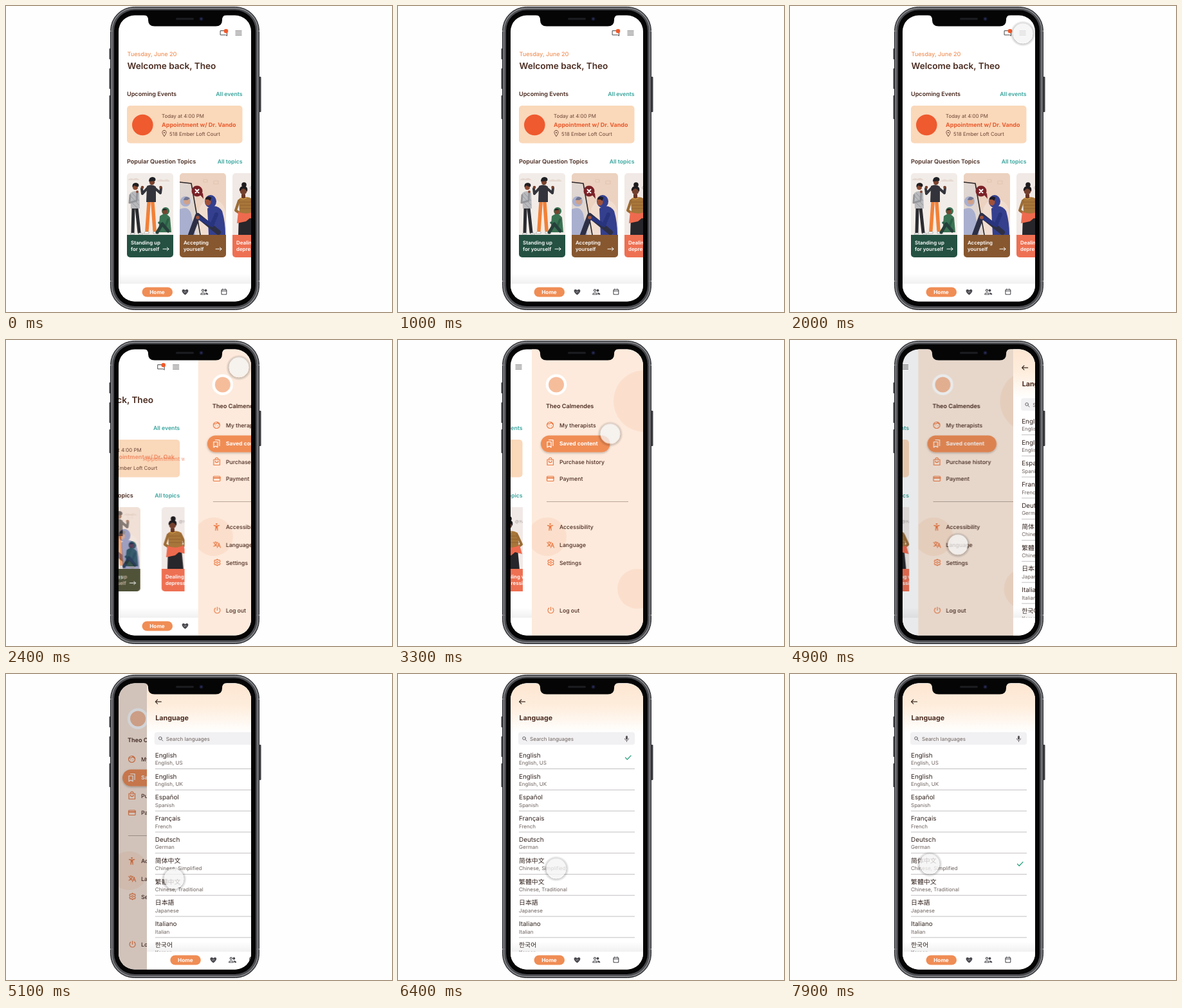
Animation of 600x476 px, one loop 8 s. Source, as an HTML page:

```html
<!DOCTYPE html>
<html lang="en">
<head>
<meta charset="utf-8">
<title>Care app prototype</title>
<style>
html, body { margin: 0; width: 100%; height: 100%; overflow: hidden; background: #fefeff; }
svg { display: block; width: 600px; height: 476px; }
text {
  font-family: Inter, "Noto Sans CJK SC", "Noto Sans CJK JP", "Noto Sans CJK KR", sans-serif;
  font-size: 8.7px; font-weight: 500; fill: #4a2b20; text-rendering: geometricPrecision;
}
.head { font-size: 9.1px; font-weight: 600; }
.link { font-size: 8.7px; font-weight: 600; fill: #36a39c; text-anchor: end; }
.small { font-size: 7.9px; font-weight: 400; fill: #6b4636; }
.visit { font-size: 9px; font-weight: 700; fill: #ea5a2c; }
.label text { font-size: 7.9px; font-weight: 600; fill: #fff; }
.row { font-size: 9.9px; font-weight: 400; fill: #33241f; }
.sub { font-size: 8px; font-weight: 400; fill: #6d625e; }
.line { fill: none; stroke-linecap: round; stroke-linejoin: round; }

/* Every part shares one 8 s clock. */
.open, .push, .fadein, .fadeout, .dim, .cursor, .first, .second { animation: 8s linear infinite both; }
.open { animation-name: open; }
.push { animation-name: push; }
.fadein { animation-name: fade; --from: 0; --to: 1; }
.fadeout { animation-name: fade; --from: 1; --to: 0; }
.dim { animation-name: dim; }
.cursor { animation-name: travel, appear; }
.first { animation-name: swap; --from: 1; --to: 0; }
.second { animation-name: swap; --from: 0; --to: 1; }

@keyframes open {
  0%, 28.06% { transform: translateX(0); animation-timing-function: ease-out; }
  33.06%, 100% { transform: translateX(var(--dx)); }
}
@keyframes push {
  0%, 60.75% { transform: translateX(0); animation-timing-function: ease-out; }
  65.75%, 100% { transform: translateX(var(--dx)); }
}
@keyframes fade {
  0%, 28.06% { opacity: var(--from); animation-timing-function: ease-out; }
  33.06%, 100% { opacity: var(--to); }
}
@keyframes dim {
  0%, 60.75% { opacity: 0; }
  61.25% { opacity: .085; }
  65.75%, 100% { opacity: .25; }
}
@keyframes swap {
  0%, 93.74% { opacity: var(--from); }
  93.75%, 100% { opacity: var(--to); }
}
@keyframes appear {
  0%, 17.5% { opacity: 0; }
  21.25%, 100% { opacity: 1; }
}
@keyframes travel {
  0%, 36% { transform: translate(362px, 42px); animation-timing-function: ease-in; }
  41.25% { transform: translate(330px, 145px); animation-timing-function: ease-out; }
  48.75%, 73.75% { transform: translate(261px, 318px); animation-timing-function: ease-in; }
  80% { transform: translate(246px, 302px); animation-timing-function: ease-out; }
  87.5%, 100% { transform: translate(217px, 295px); }
}
</style>
</head>
<body>
<svg viewBox="0 0 600 476" xmlns="http://www.w3.org/2000/svg">
<defs>
  <linearGradient id="shade" x2="0" y2="1">
    <stop offset="0" stop-color="#000" stop-opacity="0"/><stop offset="1" stop-color="#000" stop-opacity=".055"/>
  </linearGradient>
  <linearGradient id="peach" x2="0" y2="1">
    <stop offset="0" stop-color="#fde6d2"/><stop offset=".45" stop-color="#feeddc"/><stop offset="1" stop-color="#fff"/>
  </linearGradient>
  <radialGradient id="halo">
    <stop offset=".77" stop-color="#000" stop-opacity="0"/><stop offset=".78" stop-color="#000" stop-opacity=".2"/>
    <stop offset="1" stop-color="#000" stop-opacity="0"/>
  </radialGradient>
  <filter id="soft" x="-50%" y="-50%" width="200%" height="200%">
    <feDropShadow dx="0" dy="1.5" stdDeviation="1.6" flood-opacity=".25"/>
  </filter>
  <clipPath id="screen"><rect x="175" y="14.500" width="206" height="445" rx="25"/></clipPath>
  <clipPath id="strip"><rect x="100" y="150" width="284" height="260"/></clipPath>
  <clipPath id="cardShape"><rect width="72" height="131" rx="5"/></clipPath>
  <clipPath id="drawerShape"><rect x="208" y="0" width="260" height="476"/></clipPath>

  <path id="arrow" class="line" d="M0 0h9m-2.500-2.500 2.500 2.500-2.500 2.500" stroke="#fff"/>
  <path id="check" class="line" d="M353.500 130l2.800 3 5.700-6" stroke="#36a588" stroke-width="1.300"/>
  <path id="burger" d="M356.500 39h10m-10 3h10m-10 3h10" stroke="#4b4748"/>

  <g id="nav">
    <rect x="175" y="416" width="210" height="16" fill="url(#shade)"/>
    <rect x="175" y="432" width="210" height="30" fill="#fff"/>
    <rect x="211.500" y="437.500" width="47.500" height="15" rx="7.500" fill="#f08d55"/>
    <text x="235" y="447.900" text-anchor="middle" style="font-size:8.2px;font-weight:700;fill:#fff">Home</text>
    <g fill="#4b4a50">
      <path d="M278.500 449.500c-7-5-5.200-8.800-2.700-8.800 1.300 0 2.200.8 2.700 1.700.5-.9 1.400-1.700 2.700-1.700 2.500 0 4.300 3.800-2.700 8.800z"/>
      <path d="M276.500 444.500l1.300 1 1.300-1.300 1.300 1" fill="none" stroke="#fff" stroke-width=".6"/>
      <circle cx="310.500" cy="442.500" r="1.900"/>
      <path d="M310 445.700c3 0 4.300 1.300 4.300 3.300h-3z"/>
    </g>
    <g class="line" stroke="#4b4a50" stroke-width="1.100">
      <circle cx="306" cy="442.500" r="1.600"/><path d="M302.800 448.700c0-3.300 6.800-3.300 6.800 0z"/>
      <rect x="335" y="441" width="7.800" height="7.800" rx="1"/><path d="M335 443.300h7.800m-6-3.300v1m4-1v1"/>
    </g>
  </g>

  <g id="standing" clip-path="url(#cardShape)">
    <rect width="72" height="131" fill="#f2ece8"/>
    <path d="M1 11q4-5 9-2 5-4 10 2zM46 13q5-6 11-2 6-4 10 2z" fill="#e6dad2"/>
    <g class="line" stroke="#2a2b30">
      <path d="M10 54l-1 38m6-38 4 38" stroke-width="5"/>
    </g>
    <path d="M5 31q8-6 14 0l1 24H6z" fill="#b9babd"/>
    <path d="M6 36l13 14m-13-6 11 11m-9-24 11 12" stroke="#8b8e94" stroke-width=".8"/>
    <path class="line" d="M5 34l-1 12 11-3 1-13" stroke="#94969b" stroke-width="3"/><circle cx="16" cy="29" r="2" fill="#8a4a33"/>
    <circle cx="13" cy="22" r="4" fill="#8a4a33"/><path d="M8.500 22q-1-7 5.500-7 6 1 4 6-5 0-6-2z" fill="#201d20"/>
    <path class="line" d="M34 46l-3 43m9-43 3 43" stroke="#f18138" stroke-width="5.500"/>
    <path d="M31 20q8-4 14 1v24H30z" fill="#33343b"/>
    <path class="line" d="M32 23l-8 9-1-8m21 0 8 7 1-8" stroke="#33343b" stroke-width="4"/>
    <circle cx="24" cy="22" r="2.300" fill="#74402d"/><circle cx="52.500" cy="22" r="2.300" fill="#74402d"/>
    <circle cx="39" cy="14" r="4.200" fill="#7a432f"/><path d="M34 13q0-7 6-7 6 1 4 6z" fill="#1f2024"/>
    <path d="M7 93h5v2H5zm11 0h5l2 2h-7zm10-2h6v3h-8zm13 0h6l3 3h-9z" fill="#fff" stroke="#55565a" stroke-width=".4"/>
    <path d="M51 67q9-8 16 2l2 23H49z" fill="#3a7353"/>
    <circle cx="60" cy="59" r="6" fill="#3a7353"/><circle cx="59" cy="60" r="3.800" fill="#794430"/>
    <path d="M55 58q2-5 8-1z" fill="#1c1b1d"/>
    <path class="line" d="M64 72l-5 12-9-7" stroke="#2b5f46" stroke-width="3.500"/>
    <path class="line" d="M64 90l-9-11-8 13" stroke="#26403b" stroke-width="5"/>
    <rect y="96" width="72" height="35" fill="#245142"/>
    <g class="label"><text x="6" y="110.500">Standing up</text><text x="6" y="121">for yourself</text></g>
    <use href="#arrow" x="56" y="118"/>
  </g>

  <g id="accepting" clip-path="url(#cardShape)">
    <rect width="72" height="131" fill="#ecd2c0"/>
    <path d="M27 96q-4-54 22-56 23 2 23 30v26z" fill="#f1ddd0"/>
    <path d="M0 15l17 2 14 80H0z" fill="#dfd6d1"/>
    <path d="M0 56q14-6 18 8l6 32H0z" fill="#a9afce"/><circle cx="9" cy="44" r="8" fill="#a9afce"/>
    <circle cx="11" cy="44" r="4.800" fill="#cfa189"/><path d="M6 42q2-8 10-3l-4 3z" fill="#727591"/>
    <path class="line" d="M0 14l18 2 14 80" stroke="#28262a" stroke-width="1.600"/>
    <path d="M37 10h6v4h-6zm16 2h7v5h-7z" fill="none" stroke="#dcbfac" stroke-width=".7"/>
    <path d="M43 55q14-9 23 4 5 17 5 37H45z" fill="#343f8e"/>
    <path class="line" d="M60 92l-32-26-11 30" stroke="#2d2f45" stroke-width="8"/>
    <path class="line" d="M57 64l-7 17-19-11" stroke="#28347d" stroke-width="6"/><circle cx="28" cy="69" r="2.800" fill="#a0523a"/>
    <ellipse cx="48" cy="44" rx="9" ry="10" fill="#343f8e"/>
    <ellipse cx="44" cy="44.500" rx="4.600" ry="6" fill="#a0523a"/><path d="M39.500 41q2-7 10-3l-2 5-3-2z" fill="#1f1b25"/>
    <path d="M31 33l6 7-1-9z" fill="#7a2127"/><circle cx="27" cy="28" r="8.500" fill="#7a2127"/>
    <path class="line" d="M24.500 25.500l5 5m0-5-5 5" stroke="#fff" stroke-width="2"/>
    <rect y="96" width="72" height="35" fill="#87572f"/>
    <g class="label"><text x="6" y="110.500">Accepting</text><text x="6" y="121">yourself</text></g>
    <use href="#arrow" x="56" y="118"/>
  </g>

  <g id="dealing" clip-path="url(#cardShape)">
    <rect width="72" height="131" fill="#f1e9e6"/>
    <text x="27" y="25" style="font-size:6px;fill:#a9a1a0">@?!#</text>
    <path d="M10 66h21l3 31H9z" fill="#27262b"/>
    <path d="M10 40q11-6 21 0l2 24H11z" fill="#a8763a"/>
    <path d="M11 45h20m-20 5h21m-21 5h22" stroke="#875a2c" stroke-width=".7"/>
    <path class="line" d="M10 43l-5 15 9 6m16-21 7 15-8 6" stroke="#9c6c34" stroke-width="4"/>
    <path d="M9 60q13 6 25-1l4 14-11-3-6 5-14 3z" fill="#ee6a4e"/>
    <path d="M14 33h6v5q-3 4-6 0z" fill="#673626"/><circle cx="17" cy="28" r="5.300" fill="#74402e"/>
    <circle cx="18" cy="18" r="3.800" fill="#1d1a1d"/><path d="M11 28q-1-8 7-8 7 1 5 9-3-5-7-5z" fill="#1d1a1d"/>
    <path d="M12 38q5 4 10 0" fill="none" stroke="#e9b050"/>
    <rect y="96" width="72" height="35" fill="#ee7053"/>
    <g class="label open" style="--dx:7px"><text x="6" y="110.500">Dealing with</text><text x="6" y="121">depression</text></g>
    <use href="#arrow" x="58" y="118"/>
  </g>
</defs>

<!-- Phone body -->
<g fill="#3a3b3e">
  <rect x="160.500" y="66" width="3" height="17" rx="1"/><rect x="160.500" y="97" width="3" height="32" rx="1"/>
  <rect x="160.500" y="139" width="3" height="37" rx="1"/><rect x="393" y="110" width="3.500" height="55" rx="1"/>
</g>
<rect x="162.500" y="1.500" width="231" height="471" rx="37" fill="#4b4c50" stroke="#2c2d30"/>
<rect x="164.500" y="3.500" width="227" height="467" rx="35" fill="none" stroke="#8c8d91" stroke-width="1.400"/>
<rect x="168" y="6.500" width="220" height="460.500" rx="32" fill="#050506"/>
<path d="M162 39h4m-4 389h4m224-389h4m-4 389h4" stroke="#77787b" stroke-width="2"/>

<g clip-path="url(#screen)">
  <rect x="170" y="10" width="220" height="456" fill="#fff"/>
  <g class="push" style="--dx:-52px">
    <!-- Home -->
    <g class="open" style="--dx:-174px">
      <path class="line" d="M333.500 38.500h10v8l-2-1.500h-8z" stroke="#4b4748"/>
      <circle cx="342" cy="39" r="3.300" fill="#f05a2b"/>
      <use href="#burger"/>
      <text x="188.500" y="78" style="font-size:9.100px;fill:#f0935b">Tuesday, June 20</text>
      <text x="188.500" y="97.500" style="font-size:13.600px;font-weight:600">Welcome back, Theo</text>
      <text x="188" y="140" class="head">Upcoming Events</text>
      <text x="367.500" y="140" class="link">All events</text>
      <rect x="188" y="155" width="179.500" height="58.500" rx="5" fill="#fad8ba"/>
      <circle cx="212.300" cy="185" r="16.300" fill="#ef5a2f"/>
      <text x="242" y="174.300" class="small">Today at 4:00 PM</text>
      <path class="line" d="M246 202.500c-5-5.500-3-9 0-9s5 3.500 0 9z" stroke="#6b4636"/><circle cx="246" cy="197" r="1" fill="#6b4636"/>
      <text x="254" y="201.800" class="small">518 Ember Loft Court</text>
      <text x="188" y="244.500" class="head">Popular Question Topics</text>
      <text x="367.500" y="244.500" class="link">All topics</text>
    </g>
    <g class="open" style="--dx:-205px"><text x="272" y="185" class="visit fadein">Appointment w/ Dr. Oak</text></g>
    <g class="open" style="--dx:-190px" clip-path="url(#strip)">
      <g class="open" style="--dx:138px"><text x="242" y="187.500" class="visit fadeout">Appointment w/ Dr. Vando</text></g>
      <g class="open" style="--dx:-49px">
        <use href="#standing" x="188" y="260"/>
        <use href="#accepting" x="270" y="260"/>
        <g class="fadein"><use href="#standing" x="270" y="260"/></g>
      </g>
      <g class="open" style="--dx:-7px"><use href="#dealing" x="352" y="260"/></g>
    </g>
    <use href="#nav"/>

    <!-- Drawer -->
    <g transform="translate(206 0)"><g class="open" style="--dx:-206px" clip-path="url(#drawerShape)">
      <rect x="208" y="0" width="260" height="476" fill="#fdeadc"/>
      <g fill="#fbdfcc"><circle cx="383" cy="95" r="48"/><circle cx="232" cy="306" r="30"/><circle cx="372" cy="387" r="31"/></g>
      <circle cx="246" cy="69.500" r="16.300" fill="#fff"/><circle cx="246" cy="69.500" r="12" fill="#f6bd9b"/>
      <text x="230" y="106" class="head">Theo Calmendes</text>
      <rect x="222" y="148.500" width="107.500" height="26" rx="13" fill="#f08d55" filter="url(#soft)"/>
      <text x="251" y="136">My therapists</text>
      <text x="251" y="164.300" style="font-weight:700;font-size:8.500px;fill:#fff">Saved content</text>
      <text x="251" y="193">Purchase history</text>
      <text x="251" y="219">Payment</text>
      <path d="M231 251.500h127" stroke="#b9a79b"/>
      <text x="251" y="294">Accessibility</text>
      <text x="251" y="321.500">Language</text>
      <text x="251" y="349.500">Settings</text>
      <text x="251" y="424">Log out</text>
      <g class="line" stroke="#ec7b45" stroke-width="1.200">
        <circle cx="236.500" cy="132.500" r="5"/><path d="M231.800 131q5 0 6.500-3 1 3 3 3m-6.500 2.500h.1m3.300 0h.1"/>
        <g stroke="#fff"><path d="M232 158.500h6v8.500l-3-2-3 2z"/><path d="M234.500 155.500h6.500v9"/></g>
        <path d="M232 186h9.500v8.500H232zm2.500 0c0-4 4.500-4 4.500 0m-4.500 2c0 3.500 4.500 3.500 4.500 0"/>
        <rect x="231.500" y="212" width="10.500" height="7.500" rx="1"/><path d="M232 214.500h10" stroke-width="2"/>
        <path d="M232.500 288.500l4 1 4-1m-4 1v3m-1.500 3.500.5-6h2l.5 6" stroke-width="1.400"/><circle cx="236.500" cy="286.300" r=".7"/>
        <path d="M231.500 315h7m-3.500-1.500v1.500m2.500 0q-1 4-5.500 6m1-4.500 3.500 4m1 2.500 2.500-7 2.500 7m-4-2.500h3.200"/>
        <path d="M237.500 341l1.500 1.500 2.200-.2.800 2-1.200 1.700 1.200 1.700-.8 2-2.200-.2-1.500 1.500-1.500-1.500-2.200.2-.8-2 1.200-1.700-1.200-1.700.8-2 2.200.2z"/><circle cx="237.500" cy="346" r="1.500"/>
        <path d="M237.500 415.500v5m-2.800-3.500a4.500 4.500 0 1 0 5.600 0"/>
      </g>
    </g></g>
  </g>
  <rect class="dim" x="170" y="10" width="220" height="456" fill="#05101c"/>

  <!-- Language screen -->
  <g transform="translate(206 0)"><g class="push" style="--dx:-206px">
    <rect x="175" y="10" width="210" height="456" fill="#fff"/>
    <rect x="175" y="15" width="210" height="76" fill="url(#peach)"/>
    <path class="line" d="M197.500 43.200h-9m3.200-3.200-3.200 3.200 3.200 3.200" stroke="#3d2a23" stroke-width="1.200"/>
    <text x="188.500" y="72" style="font-size:10.700px;font-weight:700">Language</text>
    <rect x="187" y="90.500" width="181" height="19.500" rx="4" fill="#f1f0f2"/>
    <g class="line" stroke="#68646a"><circle cx="196" cy="100" r="2.300"/><path d="M197.800 101.800l2.200 2.200M352.500 100.500c0 4 6 4 6 0m-3 3v1.700"/></g>
    <rect x="354" y="96" width="3" height="6" rx="1.500" fill="#58545a"/>
    <text x="205" y="104" class="sub">Search languages</text>
    <g id="rows"></g>
    <use href="#check" class="first"/>
    <g class="second"><use href="#check" y="165.500"/></g>
    <use href="#nav"/>
  </g></g>

  <g class="cursor">
    <circle cy="1" r="20" fill="url(#halo)"/>
    <circle r="15.500" fill="#f4f3f3" fill-opacity=".78"/>
  </g>
</g>

<!-- Notch -->
<path d="M214 14q7 0 7 8 0 9.500 10 9.500h95q10 0 10-9.500 0-8 7-8z" fill="#050506"/>
<rect x="264" y="18.500" width="28" height="3" rx="1.500" fill="#1d1e21"/>
<circle cx="303.500" cy="20" r="3" fill="#15172b"/><circle cx="303.500" cy="20" r="1.300" fill="#2b3168"/>
</svg>
<script>
const languages = [
  ["English", "English, US"], ["English", "English, UK"], ["Español", "Spanish"],
  ["Français", "French"], ["Deutsch", "German"], ["简体中文", "Chinese, Simplified"],
  ["繁體中文", "Chinese, Traditional"], ["日本語", "Japanese"], ["Italiano", "Italian"], ["한국어", "Korean"]
];
document.getElementById("rows").innerHTML = languages.map(([name, sub], i) => {
  const y = 32.8 * i;
  return `<text x="188" y="${129.7 + y}" class="row">${name}</text>
    <text x="188" y="${141.2 + y}" class="sub">${sub}</text>
    <path d="M188 ${147.5 + y}h180" stroke="#bdb9bb" stroke-width=".9"/>`;
}).join("");
</script>
</body>
</html>
```
